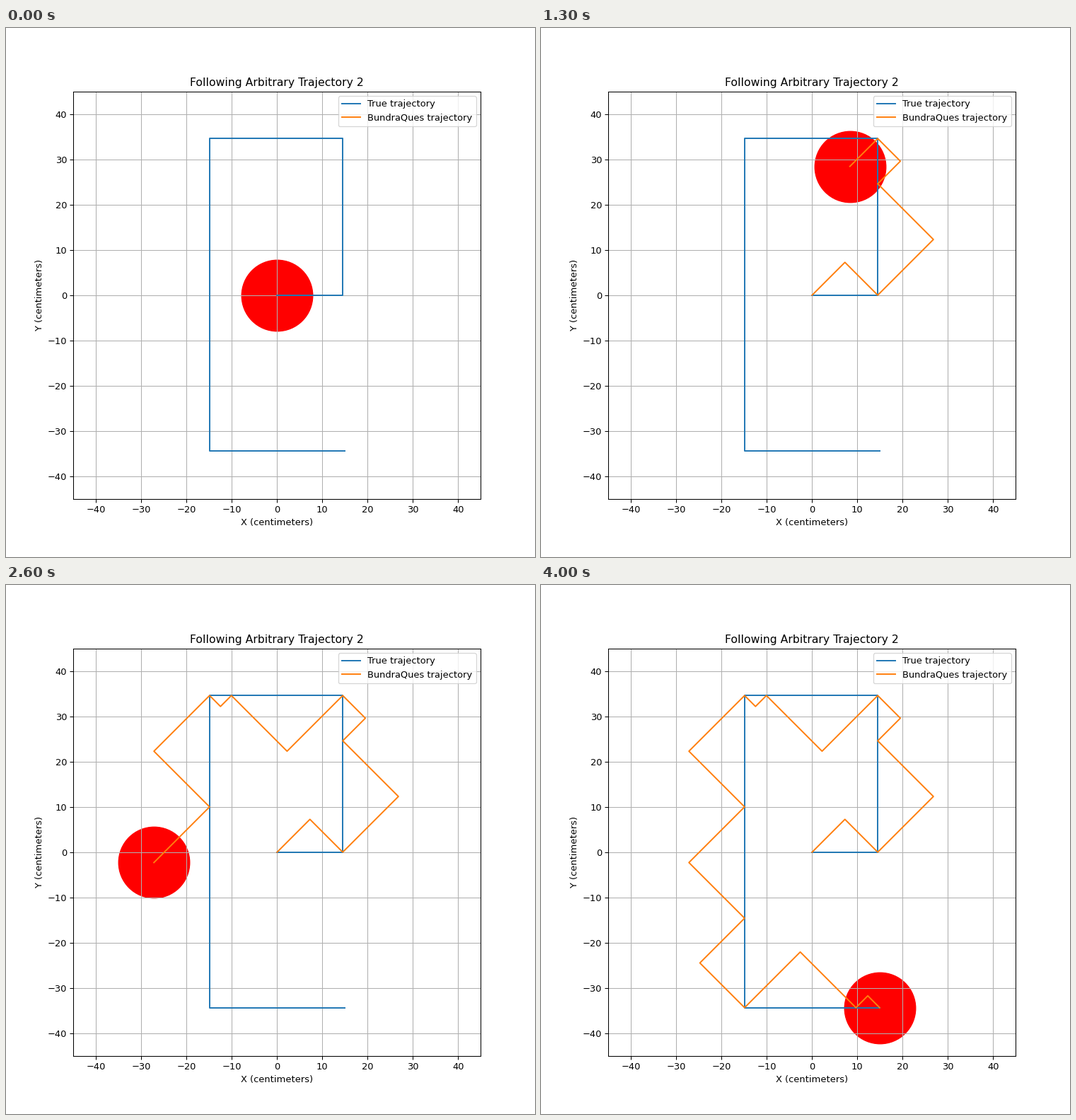
Recreate the animation shown at these times as a matplotlib script. Size 748x748 px, loop 4100 ms.

```python
import math

import numpy as np
import matplotlib.pyplot as plt
from matplotlib.animation import FuncAnimation

SIZE, INCHES = 748, 8
INTERVAL = 100
STRIDE = 24.6  # longest stride along a leg, in centimeters

# Corners of the route: a hook walked from the origin
RIGHT, LEFT, TOP, BOTTOM = 14.5, -14.92, 34.6, -34.36
ROUTE = np.array([(0, 0), (RIGHT, 0), (RIGHT, TOP), (LEFT, TOP),
                  (LEFT, BOTTOM), (-LEFT, BOTTOM)])


def zigzag(route):
    """Cover each leg in right-angled strides, four half-edges per stride."""
    points = [route[0]]
    side = 1  # strides bulge left, then right, alternating by leg
    for start, end in zip(route, route[1:]):
        length = math.dist(start, end)
        along = (end - start) / length
        across = side * np.array([-along[1], along[0]])
        done = 0
        while done < length:
            stride = min(STRIDE, length - done)
            for part in (0.25, 0.5, 0.75, 1):
                bulge = min(part, 1 - part) * stride
                points.append(start + (done + part * stride) * along
                              + bulge * across)
            done += stride
        side = -side
    return np.array(points)


path = zigzag(ROUTE)

fig, ax = plt.subplots(figsize=(INCHES, INCHES), dpi=SIZE / INCHES)
ax.set_aspect("equal")
ax.set(xlim=(-45, 45), ylim=(-45, 45),
       xticks=range(-40, 41, 10), yticks=range(-40, 41, 10),
       xlabel="X (centimeters)", ylabel="Y (centimeters)",
       title="Following Arbitrary Trajectory 2")
ax.grid(True)

ax.plot(*ROUTE.T, color="tab:blue", label="True trajectory")
trail, = ax.plot([], [], color="tab:orange", label="BundraQues trajectory")
robot = ax.scatter([0], [0], s=6000, color="red")
ax.legend(loc="upper right")


def update(frame):
    trail.set_data(*path[:frame + 1].T)
    robot.set_offsets(path[frame:frame + 1])
    return trail, robot


anim = FuncAnimation(fig, update, frames=len(path), interval=INTERVAL,
                     repeat=True, repeat_delay=0)
plt.show()
```
